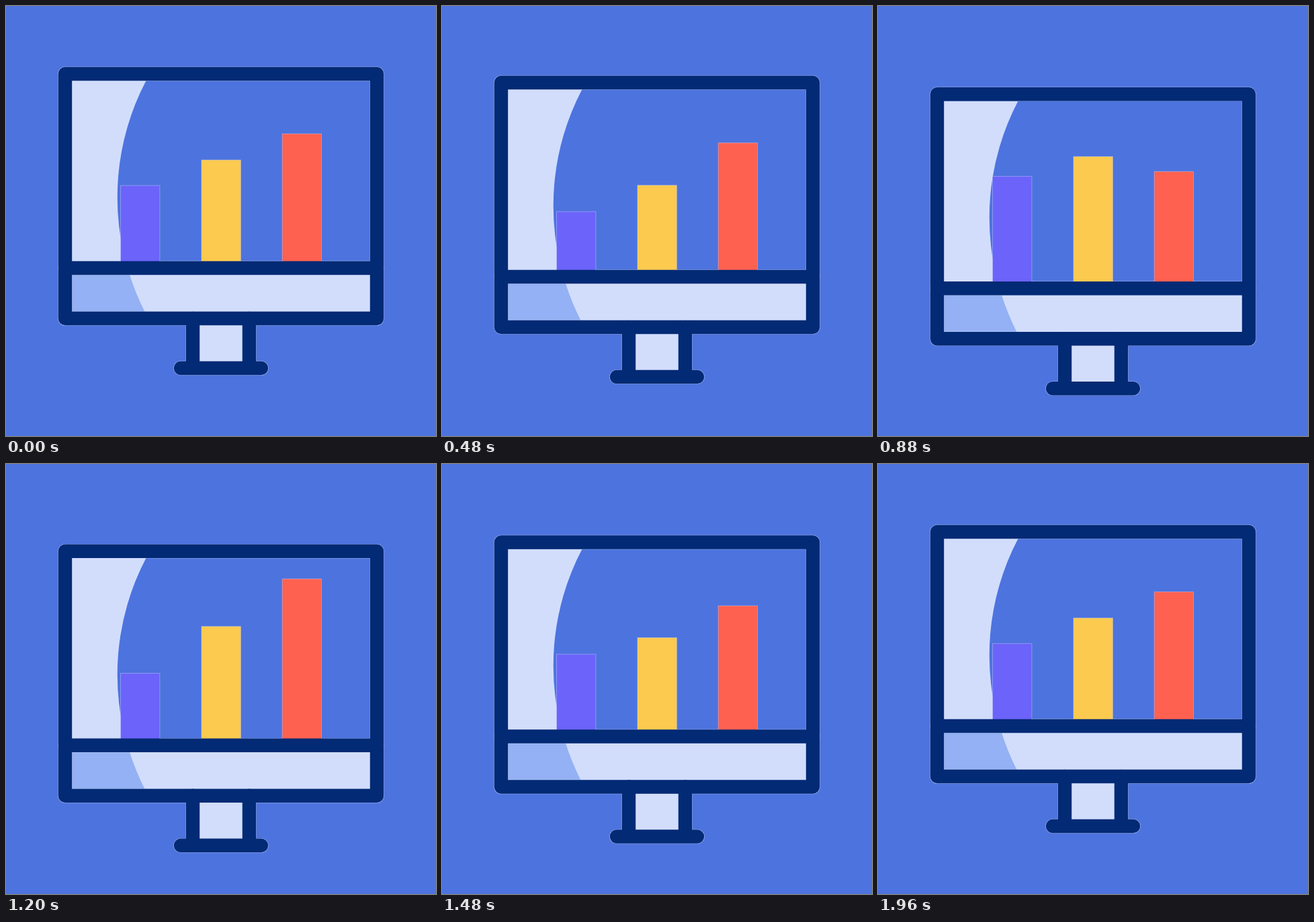
An HTML page that plays this animation: 640 by 640 pixels, repeating every 2 s.

```html
<!DOCTYPE html>
<html lang="en">
<head>
<meta charset="utf-8">
<title>Monitor with bar chart</title>
<style>
  html, body { margin: 0; width: 100%; height: 100%; overflow: hidden; background: #4d73de; }
  svg { display: block; width: 100%; height: 100%; }
</style>
</head>
<body>
<svg viewBox="0 0 640 640">
  <defs>
    <clipPath id="screen"><rect x="98" y="111" width="444" height="269"/></clipPath>
    <g id="frame" fill="none" stroke-linecap="round" stroke-linejoin="round">
      <rect x="88" y="101" width="464" height="364"/>
      <path d="M88 390H552M278 465V539M362 465V539M260 539H380"/>
    </g>
  </defs>
  <rect width="640" height="640" fill="#4d73de"/>
  <g id="monitor">
    <path d="M98 111H208.6A373.5 373.5 0 0 0 184 400H98Z" fill="#d2ddfc" clip-path="url(#screen)"/>
    <rect x="98" y="400" width="444" height="55" fill="#d2ddfc"/>
    <path d="M98 400H184A373.5 373.5 0 0 0 206.5 455H98Z" fill="#93b1f4"/>
    <rect x="288" y="475" width="64" height="54" fill="#d2ddfc"/>
    <use href="#frame" stroke="#d2ddfc" stroke-width="21.6" stroke-opacity=".6"/>
    <g id="bars" stroke="#d2ddfc" stroke-width="1" stroke-opacity=".4"></g>
    <use href="#frame" stroke="#032a74" stroke-width="20.4"/>
  </g>
</svg>
<script>
const LOOP = 2000, STEP = 40, BASE = 390;
const monitor = document.getElementById('monitor');
const barGroup = document.getElementById('bars');

// Keys are [time in ms, value].
const bobKeys = [[40, 0], [1000, 31], [1960, 0]];
const stretchKeys = [[40, 0], [400, -31], [800, 48], [1200, -15.5], [1520, 0]];

const bars = [
  { x: 170.5, top: 267.2, delay: 0, fill: '#6c63fa' },
  { x: 291, top: 229.2, delay: 200, fill: '#fcca4f' },
  { x: 411.2, top: 190.2, delay: 400, fill: '#ff6150' }
].map(bar => {
  const node = document.createElementNS('http://www.w3.org/2000/svg', 'rect');
  node.setAttribute('x', bar.x);
  node.setAttribute('width', 58.4);
  node.setAttribute('fill', bar.fill);
  barGroup.append(node);
  return { ...bar, node };
});

// cubic-bezier(.5, 0, .5, 1), solved by bisection
function ease(x) {
  let low = 0, high = 1;
  for (let i = 0; i < 24; i++) {
    const s = (low + high) / 2;
    if (1.5 * s * (1 - s) + s ** 3 < x) low = s; else high = s;
  }
  return low * low * (3 - 2 * low);
}

function valueAt(keys, t) {
  if (t <= keys[0][0]) return keys[0][1];
  for (let i = 1; i < keys.length; i++) {
    const [t0, a] = keys[i - 1], [t1, b] = keys[i];
    if (t < t1) return a + (b - a) * ease((t - t0) / (t1 - t0));
  }
  return keys[keys.length - 1][1];
}

function draw(t) {
  monitor.setAttribute('transform', `translate(0 ${valueAt(bobKeys, t)})`);
  for (const { node, top, delay } of bars) {
    const y = top - valueAt(stretchKeys, t - delay);
    node.setAttribute('y', y);
    node.setAttribute('height', BASE - y);
  }
}

const start = performance.now();
function tick() {
  const t = (performance.now() - start) % LOOP;
  draw(Math.floor(t / STEP) * STEP);
  requestAnimationFrame(tick);
}
draw(0);
requestAnimationFrame(tick);
</script>
</body>
</html>
```
